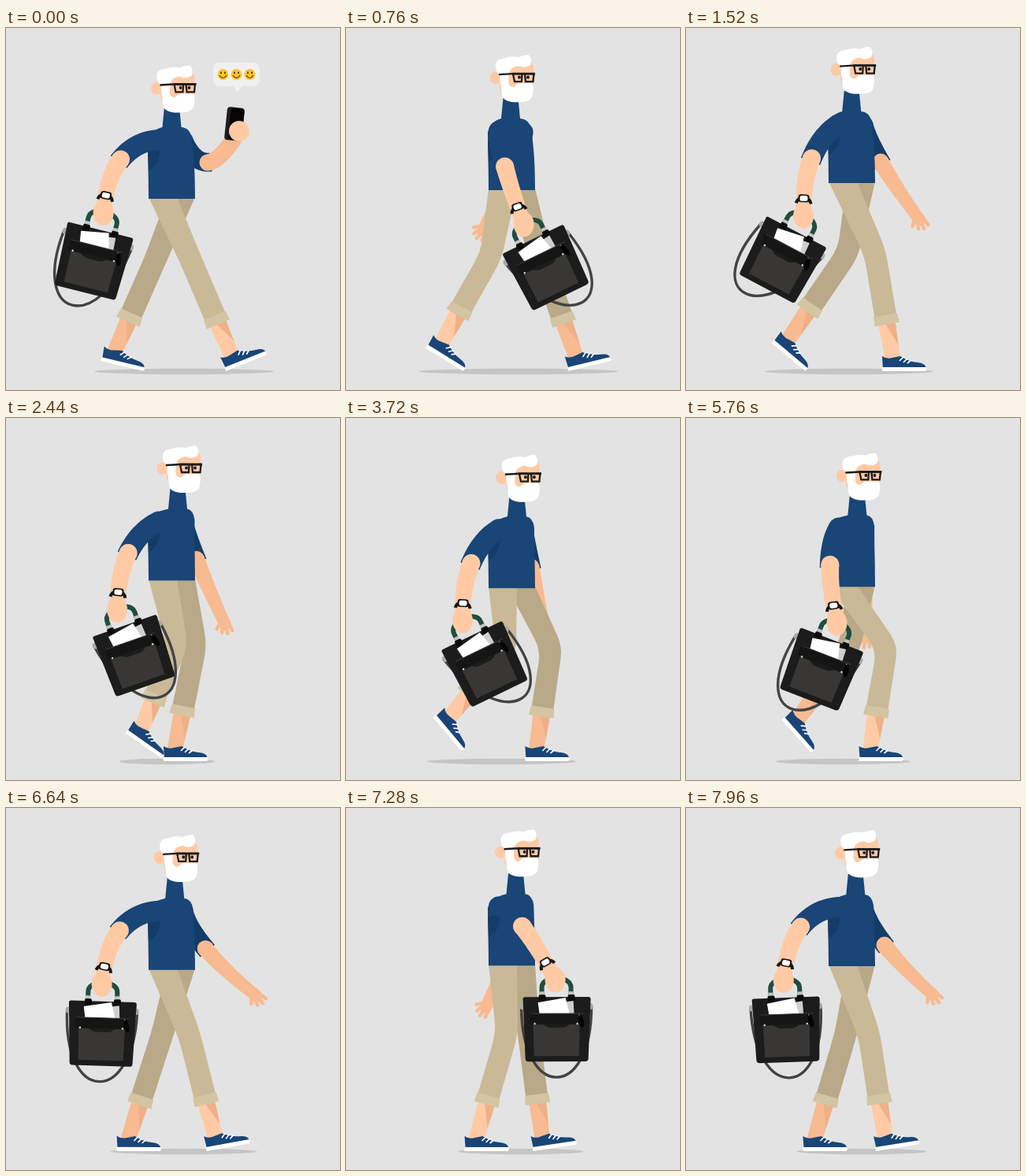
These frames come from a looping animation (424 px wide and 460 px high, 8 s). An HTML page with a canvas:

```html
<!DOCTYPE html>
<html lang="en">
<head>
<meta charset="utf-8">
<title>Walking man with a bag</title>
<style>
html, body { margin: 0; width: 100%; height: 100%; overflow: hidden; background: #e3e3e3; }
canvas { display: block; width: 424px; height: 460px; }
</style>
</head>
<body>
<canvas id="stage"></canvas>
<script>
const canvas = document.getElementById('stage');
const ctx = canvas.getContext('2d');
const ratio = window.devicePixelRatio || 1;
canvas.width = 424 * ratio;
canvas.height = 460 * ratio;

const LOOP = 8000, STRIDE = 1347, START = 0.377;
const GROUND = 436, SHOE = 56;
const C = {
  bg: '#e3e3e3', shadow: '#c5c5c5', navy: '#194577', navyDark: '#133d68',
  skin: '#ffcaa4', skinFar: '#f8ba90', skinShade: '#eeb088',
  khaki: '#c9b997', khakiFar: '#b9a988', cuff: '#d3c5a3',
  bag: '#1c1c1c', pocket: '#383735', strap: '#424346', green: '#1f4d40'
};

const { cos, sin, min, max, hypot, atan2, PI } = Math;
const TURN = 2 * PI;
const mix = (a, b, k) => a + (b - a) * k;
const mixPt = (a, b, k) => [mix(a[0], b[0], k), mix(a[1], b[1], k)];
const ease = (t, from, to) => {
  const k = max(0, min(1, (t - from) / (to - from)));
  return k * k * (3 - 2 * k);
};
const unit = (a, b) => {
  const dx = b[0] - a[0], dy = b[1] - a[1], d = hypot(dx, dy) || 1;
  return [dx / d, dy / d];
};
const degrees = u => atan2(u[1], u[0]) * 180 / PI;
const shift = (p, u, along, across) =>
  [p[0] + u[0] * along + u[1] * across, p[1] + u[1] * along - u[0] * across];

// Motion: every function takes the phase of a stride, 0 to 1.

// Two small dips of the body in every step.
const waistAt = p => 207 - 10 * cos(4 * TURN * p);
const headAt = p => 219.5 + 4.5 * sin(2 * TURN * (p - 0.07));
const bagAngle = p => -1.5 - 30 * cos(TURN * (p - 0.04));

// The second step of a stride is a little shorter.
const squeezeAt = p => 24 * max(0, -cos(TURN * p)) ** 8;

// Flat on the ground, peeling off, swinging through, toe up before landing.
const footAngle = q =>
  40 * ease(q, 0.3, 0.5) + 10 * ease(q, 0.5, 0.64) - 59 * ease(q, 0.64, 0.79) -
  13 * ease(q, 0.79, 0.88) + 22 * ease(q, 0.9, 1);

function legPose(q, waist, push) {
  const a = TURN * q, angle = footAngle(q), rad = angle * PI / 180;
  const knee = [222 + 40 * cos(a) + 10 * sin(2 * a) + 7 * sin(3 * a) + push, 289 + 0.4 * (waist - 207)];
  const heel = [
    184 + 99 * cos(a) - 16 * sin(a) - 4 * cos(2 * a) - 16 * sin(2 * a) - 5 * cos(3 * a) + 6 * sin(3 * a) + push,
    GROUND - SHOE * max(0, sin(rad)) - 13 * ease(q, 0.52, 0.62) * (1 - ease(q, 0.63, 0.72))
  ];
  const ankle = [heel[0] + 14 * cos(rad) + 13 * sin(rad), heel[1] + 14 * sin(rad) - 13 * cos(rad)];
  return { knee, heel, ankle, angle, toe: heel[0] + SHOE * cos(rad), cuff: mixPt(knee, ankle, 0.62) };
}

// Both hands rise as they swing away from the shoulder.
function nearArm(p, waist) {
  const a = TURN * p;
  const x = 179 + 30 * cos(a) - 60 * sin(a) - 11 * cos(2 * a) - 15 * sin(2 * a) - 10 * cos(3 * a);
  const lift = min(1, ((x - 190) / 65) ** 4);
  return {
    shoulder: [194, waist - 75],
    elbow: [182 + 0.55 * (x - 190), waist - 28 - 22 * lift],
    hand: [x, waist + 46 - 28 * lift]
  };
}
function farArm(p, waist, raised) {
  const x = 244 + 76 * cos(TURN * (p - 0.37));
  const lift = ((x - 230) / 90) ** 2;
  return {
    shoulder: [226, waist - 74],
    elbow: mixPt([228 + 0.3 * (x - 230), waist - 27], [256, waist - 46], raised),
    hand: mixPt([x, waist + 60 - 34 * lift], [294, waist - 84], raised)
  };
}

// Drawing helpers

function fill(path, color) { ctx.fillStyle = color; ctx.fill(new Path2D(path)); }
function stroke(path, color, width) {
  ctx.strokeStyle = color; ctx.lineWidth = width; ctx.stroke(new Path2D(path));
}
function poly(points, color) {
  ctx.beginPath();
  points.forEach(p => ctx.lineTo(p[0], p[1]));
  ctx.closePath();
  ctx.fillStyle = color;
  ctx.fill();
}
function oval(x, y, rx, ry, color, turn = 0) {
  ctx.beginPath();
  ctx.ellipse(x, y, rx, ry, turn, 0, TURN);
  ctx.fillStyle = color;
  ctx.fill();
}
function box(x, y, w, h, r, color) {
  ctx.beginPath();
  ctx.roundRect(x, y, w, h, r);
  ctx.fillStyle = color;
  ctx.fill();
}
function at(x, y, angle, draw) {
  ctx.save();
  ctx.translate(x, y);
  ctx.rotate(angle * PI / 180);
  draw();
  ctx.restore();
}

// Tapered tube along a quadratic curve.
function hose(a, c, b, w0, w1, color) {
  const left = [], right = [];
  for (let i = 0; i <= 14; i++) {
    const k = i / 14, p = mixPt(a, c, k), q = mixPt(c, b, k);
    const m = mixPt(p, q, k), u = unit(p, q), w = mix(w0, w1, k) / 2;
    left.push(shift(m, u, 0, -w));
    right.unshift(shift(m, u, 0, w));
  }
  poly([...left, ...right], color);
}

// One smooth curve from shoulder to hand, halved at the elbow.
function drawArm({ shoulder, elbow, hand }, widths, sleeve, skin) {
  const c = [0, 1].map(i => 2 * elbow[i] - (shoulder[i] + hand[i]) / 2);
  const upper = mixPt(shoulder, c, 0.5), lower = mixPt(c, hand, 0.5);
  const [top, cuff, wrist] = widths;
  oval(...shoulder, top / 2, top / 2, sleeve);
  hose(shoulder, upper, shift(elbow, unit(upper, elbow), 4, 0), top, cuff, sleeve);
  oval(...elbow, cuff / 2 - 1.5, cuff / 2 - 1.5, skin);
  hose(elbow, lower, hand, cuff - 3, wrist, skin);
  return lower;
}

function drawLeg({ knee, heel, ankle, cuff, angle }, left, waist, color, skin) {
  const topL = [left, waist - 2], topR = [left + 36, waist - 2];
  const thigh = unit(mixPt(topL, topR, 0.5), knee), shin = unit(knee, cuff);
  const mid = unit([0, 0], [thigh[0] + shin[0], thigh[1] + shin[1]]);

  hose(cuff, mixPt(cuff, ankle, 0.5), ankle, 22, 19, skin);
  poly([shift(cuff, shin, 0, -4), shift(cuff, shin, 0, 11), shift(mixPt(cuff, ankle, 0.65), shin, 0, 10)], C.skinShade);

  at(...heel, angle, () => {
    fill('M1 -4L0 -19Q6 -15 13 -17L23 -19Q34 -12 45 -11Q55 -10 56 -4Z', C.navy);
    fill('M0 -5H56Q57 0 54 0H0Z', '#fff');
    stroke('M22 -13L27 -18M27 -11L32 -16M32 -10L37 -14', '#fff', 1.7);
  });

  const sides = [-14, 14].map(w => [shift(knee, mid, 0, w), shift(cuff, shin, 0, w)]);
  const curve = (a, k, b) => {
    ctx.lineTo(...mixPt(a, k, 0.82));
    ctx.quadraticCurveTo(...k, ...mixPt(k, b, 0.2));
    ctx.lineTo(...b);
  };
  const [[kneeL, cuffL], [kneeR, cuffR]] = sides;
  ctx.beginPath();
  ctx.moveTo(...topL);
  curve(topL, kneeL, cuffL);
  ctx.lineTo(...cuffR);
  curve(cuffR, kneeR, topR);
  ctx.closePath();
  ctx.fillStyle = color;
  ctx.fill();
  poly([[-6, -15], [-6, 15], [6, 16], [6, -16]].map(([a, n]) => shift(cuff, shin, a, n)), C.cuff);
}

function drawFarArm(arm, raised) {
  const lower = drawArm(arm, [23, 24, mix(15, 21, raised)], C.navyDark, C.skinFar);
  const [x, y] = arm.hand;
  if (raised > 0.5) {
    at(x - 4, y - 11, 6, () => {
      box(-11, -21, 22, 42, 4, '#1d1d1d');
      box(-6, -20, 17, 40, 3, '#050505');
    });
    oval(x + 2, y - 2, 13, 13, C.skin);
    return;
  }
  at(x, y, degrees(unit(lower, arm.hand)), () => {
    ctx.lineCap = 'round';
    oval(2, 0, 10, 8, C.skinFar);
    stroke('M5 -5L16 -5M6 0L17 2M5 4L13 8M0 4L6 12', C.skinFar, 4.6);
  });
}

function drawBubble(scale) {
  if (scale <= 0) return;
  ctx.save();
  ctx.translate(294, 82);
  ctx.scale(scale, scale);
  box(-31, -38, 59, 30, 8, '#f0f0f0');
  fill('M-6 -9H6L0 0Z', '#f0f0f0');
  for (let i = 0; i < 3; i++) {
    const x = 17 * i - 18.5;
    oval(x, -23, 7, 7, '#fdc62f');
    oval(x - 2.5, -25, 1, 1.4, '#5b3a12');
    oval(x + 2.5, -25, 1, 1.4, '#5b3a12');
    stroke(`M${x - 4.5} -22Q${x} -15 ${x + 4.5} -22`, '#70410f', 1.2);
  }
  ctx.restore();
}

function drawTorso(waist, headX) {
  const n = headX - 6, lean = 0.5 * (headX - 217);
  at(0, waist, 0, () => {
    fill(`M181 0C181 -28 180 -55 180 -74Q${185 + lean} -88 ${n - 12} -91L${n - 9.5} -117H${n + 9.5}
      L${n + 12} -91Q${234 + lean} -90 ${236 + lean} -77C239 -52 240 -28 240 0Z`, C.navy);
    fill('M181 -36Q196 -44 196 -67L180 -62Z', C.navyDark);
  });
}

function drawHead(x, y) {
  at(x, y, 0, () => {
    oval(-25, 28, 7.5, 8, C.skin);
    box(-20, 8, 43, 38, 6, C.skin);
    fill(`M-19 36L-20 23Q-25 21 -25 14Q-26 4 -13 3Q-5 0 4 2Q10 -1 17 -1Q22 4 19 12
      Q12 17 4 13Q-6 14 -8 22L-9 36Z`, '#fff');
    fill(`M-19 31H-9Q-8 42 -1 39Q3 34 10 35L21 35Q23 36 23 40L22 50Q20 59 5 59
      Q-15 60 -17 50Z`, '#fff');
    stroke('M-21 24L-4 23', '#1b1b1b', 2.4);
    stroke('M-3 23H8.5L8 33H-1ZM12 23H23.5L22.5 33H13Z', '#1b1b1b', 2.3);
    stroke('M-4 23H25', '#1b1b1b', 2.8);
    oval(5, 27.5, 1.9, 2.1, '#1b1b1b');
    oval(16, 27.5, 1.9, 2.1, '#1b1b1b');
  });
}

function drawBag(x, y, angle) {
  // The loose strap swings wider than the bag.
  const rad = angle * PI / 180, swing = rad * 1.5;
  const spot = (lx, ly) => [x + lx * cos(rad) - ly * sin(rad), y + lx * sin(rad) + ly * cos(rad)];
  const l = spot(-43, 34), r = spot(46, 34), drop = [-120 * sin(swing), 120 * cos(swing)];
  stroke(`M${l}C${l[0] + drop[0]} ${l[1] + drop[1]} ${r[0] + drop[0]} ${r[1] + drop[1]} ${r}`, C.strap, 3.4);

  at(x, y, angle, () => {
    ctx.translate(0, 2);
    oval(-42, 32, 3, 4, '#a9a9a9');
    oval(45, 32, 3, 4, '#a9a9a9');
    stroke('M-17 18V8C-17 -8 20 -8 20 8V18', C.green, 6);
    stroke('M-17 13V20M20 13V20', '#c2c5c2', 6);
    fill('M-41 22Q-41 20 -38 20H42Q45 20 45 23L42 98Q42 102 38 102H-34Q-38 102 -38 98Z', C.bag);
    box(-21, 17, 9, 8, 2, '#0d0d0d');
    box(16, 17, 9, 8, 2, '#0d0d0d');
    fill('M2 28L23 25L24 42H2Z', '#cfcfcf');
    fill('M-22 27L13 21L18 41H-20Z', '#fff');
    fill('M-32 41H35V54H-32Z', '#151515');
    stroke('M-31 41H36', '#3a3a39', 1);
    fill('M-28 55H-15Q-10 59 -5 59H10Q15 58 18 55H31L30 95H-27Z', C.pocket);
    oval(-26, 54, 1.3, 1.3, '#ccc');
    oval(28, 54, 1.3, 1.3, '#ccc');
    stroke('M30 42L33 47', '#888', 1.2);
    oval(33, 51, 3.3, 8, '#050505', -0.25);
  });
}

function drawNearArm(arm) {
  oval(...arm.hand, 13, 16, C.skin);
  const lower = drawArm(arm, [26, 26, 19], C.navy, C.skin);
  const a = mixPt(arm.elbow, lower, 0.74), b = mixPt(lower, arm.hand, 0.74);
  at(...mixPt(a, b, 0.74), degrees(unit(a, b)) - 90, () => {
    stroke('M-9.5 6Q-8 -1 0 -1Q8 -1 9.5 6', '#161616', 4);
    box(-7, -5.5, 14, 10, 3.5, '#161616');
    box(-5, -3.8, 10, 6.8, 2.5, '#fff');
  });
}

function draw(t) {
  const p = (START + t / STRIDE) % 1;
  const waist = waistAt(p), headX = headAt(p), squeeze = squeezeAt(p);
  const near = legPose((p + 0.5) % 1, waist, -squeeze);
  const far = legPose(p, waist, squeeze);
  const arm = nearArm(p, waist);
  const raised = 1 - ease(t, 240, 680);

  ctx.setTransform(ratio, 0, 0, ratio, 0, 0);
  ctx.fillStyle = C.bg;
  ctx.fillRect(0, 0, 424, 460);

  const from = min(near.heel[0], far.heel[0]) - 8, to = max(near.toe, far.toe) + 9;
  oval((from + to) / 2, 436.5, (to - from) / 2, 3.7, C.shadow);

  drawFarArm(farArm(p, waist, raised), raised);
  drawLeg(far, 204, waist, C.khakiFar, C.skinFar);
  drawLeg(near, 181, waist, C.khaki, C.skin);
  drawTorso(waist, headX);
  drawHead(headX, waist - 170.5 + (waist - 207) * 0.2);
  drawBag(...arm.hand, bagAngle(p));
  drawNearArm(arm);
  drawBubble(1 - ease(t, 120, 320));
}

const begin = performance.now();
function tick() {
  draw((performance.now() - begin) % LOOP);
  requestAnimationFrame(tick);
}
tick();
</script>
</body>
</html>
```
